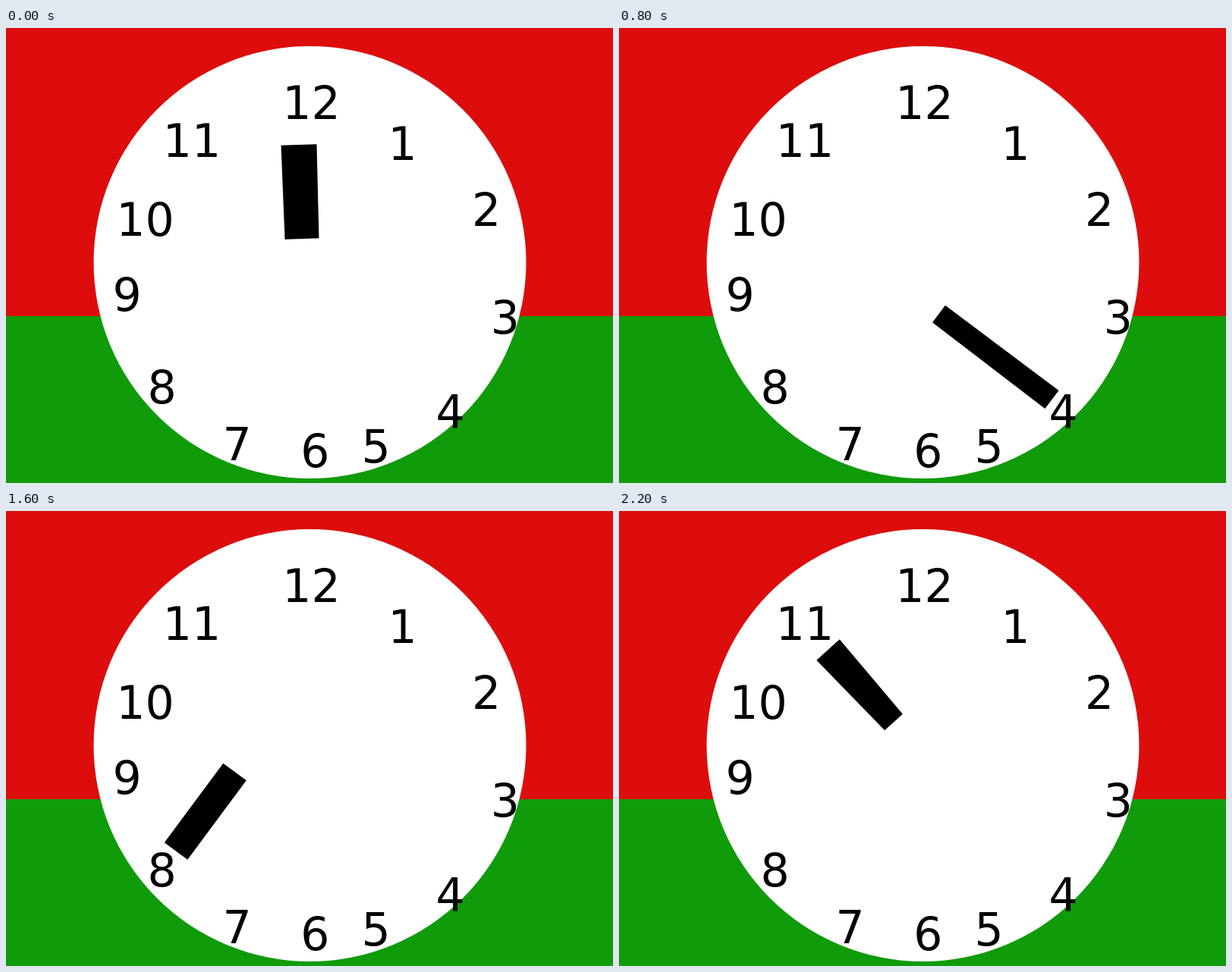
These frames come from a looping animation (800x600 px, 2.4 s). An HTML page with a canvas:

```html
<!DOCTYPE html>
<html lang="en">
<head>
<meta charset="utf-8">
<title>Clock</title>
<style>
  html, body { margin: 0; width: 100%; height: 100%; overflow: hidden; }
  canvas { display: block; }
</style>
</head>
<body>
<canvas id="stage" width="800" height="600"></canvas>
<script>
const ctx = document.getElementById('stage').getContext('2d');
const STEP = 200;

// From twelve onward: numeral centre and baseline, hand ends, hand width at each end
const hours = [
  { text: [402.5, 120], base: [390, 278], tip: [386, 154], width: [45, 47] },
  { text: [522.7, 174], base: [433, 290], tip: [486, 215], width: [36, 36] },
  { text: [633.2, 261], base: [432, 314], tip: [599, 279.5], width: [31, 44] },
  { text: [657.8, 403], base: [437, 352], tip: [624, 381], width: [33, 35] },
  { text: [585.7, 527], base: [421.5, 377], tip: [570.5, 490], width: [28, 30] },
  { text: [487.5, 573], base: [399.5, 392.5], tip: [468.5, 519.5], width: [34, 34] },
  { text: [407.3, 579], base: [395, 392.5], tip: [409.5, 522], width: [36, 34] },
  { text: [304.5, 570], base: [360.5, 364.5], tip: [292, 518.5], width: [37, 37] },
  { text: [205.7, 495], base: [301.5, 344], tip: [224, 448.5], width: [38, 38] },
  { text: [159.5, 373], base: [328.5, 343], tip: [189, 360.5], width: [36, 36] },
  { text: [183.5, 274], base: [350, 314.5], tip: [240, 260.5], width: [56, 37] },
  { text: [245, 170], base: [362, 278.5], tip: [275.5, 183], width: [32, 41] }
];

function drawFace() {
  ctx.fillStyle = '#dd0d0d';
  ctx.fillRect(0, 0, 800, 380);
  ctx.fillStyle = '#109b0a';
  ctx.fillRect(0, 380, 800, 220);
  ctx.fillStyle = '#fff';
  ctx.beginPath();
  ctx.arc(400.5, 309, 285, 0, Math.PI * 2);
  ctx.fill();
  ctx.fillStyle = '#000';
  ctx.font = '60px "DejaVu Sans", sans-serif';
  ctx.textAlign = 'center';
  hours.forEach(({ text }, i) => ctx.fillText(i || 12, ...text));
}

// A tapered bar with square ends
function drawHand({ base, tip, width }) {
  const length = Math.hypot(tip[0] - base[0], tip[1] - base[1]);
  const angle = Math.atan2(tip[1] - base[1], tip[0] - base[0]);
  const [near, far] = width.map(w => w / 2);
  ctx.save();
  ctx.translate(...base);
  ctx.rotate(angle);
  ctx.beginPath();
  ctx.moveTo(0, -near);
  ctx.lineTo(length, -far);
  ctx.lineTo(length, far);
  ctx.lineTo(0, near);
  ctx.fill();
  ctx.restore();
}

function render() {
  const hour = Math.floor(performance.now() / STEP) % hours.length;
  drawFace();
  drawHand(hours[hour]);
  requestAnimationFrame(render);
}

render();
</script>
</body>
</html>
```
